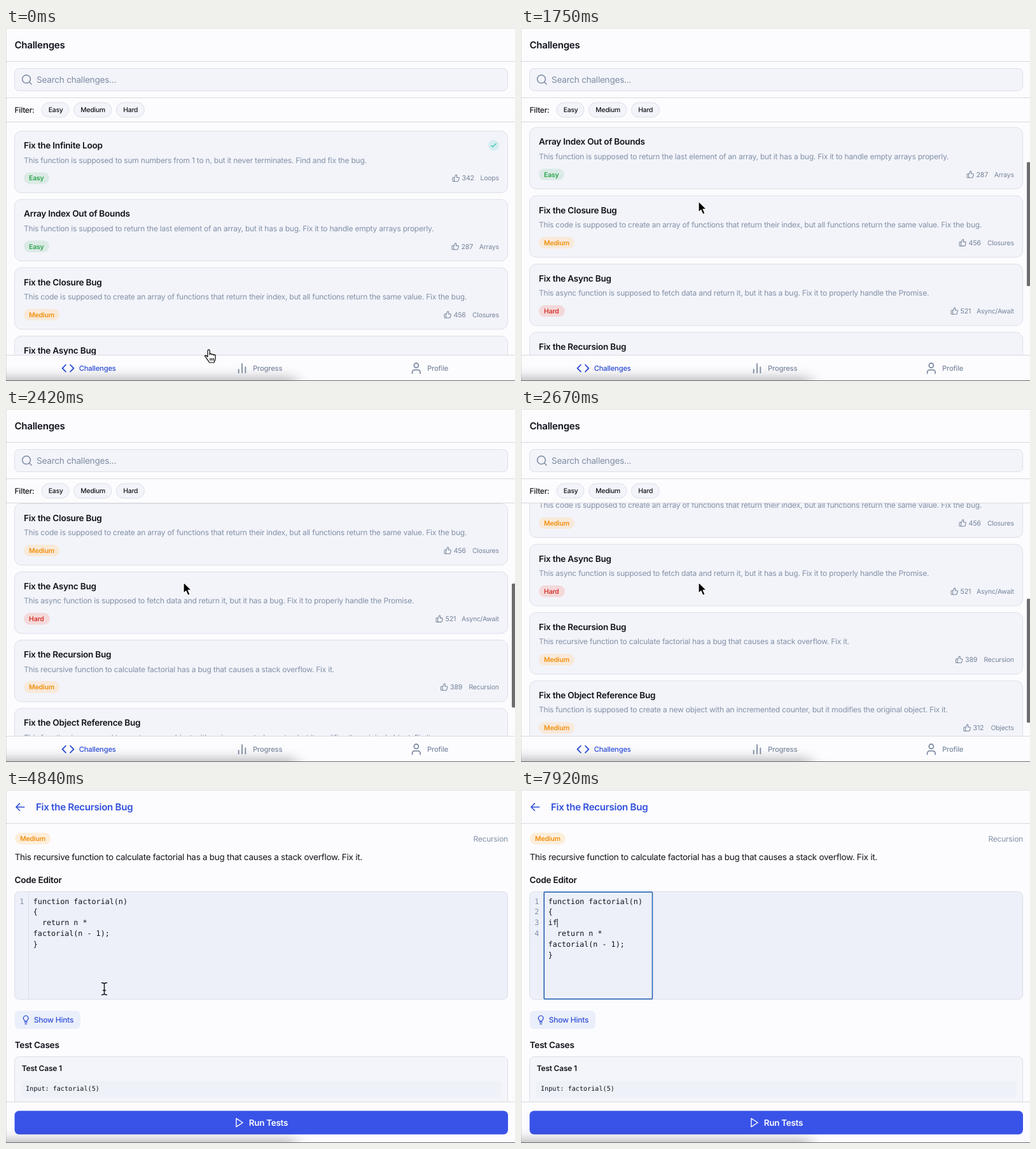
These frames come from a looping animation (800 px wide and 554 px high, 8000 ms). An HTML page:

```html
<!DOCTYPE html>
<html lang="en">
<head>
<meta charset="utf-8">
<title>Challenges</title>
<style>
html, body { margin: 0; width: 100%; height: 100%; overflow: hidden; background: #fcfcfe; }
svg { display: block; }
text {
  font-family: Inter, "Open Sans", sans-serif; letter-spacing: -.0185em;
  text-rendering: geometricPrecision; white-space: pre;
}
.mono { font-family: "DejaVu Sans Mono", monospace; letter-spacing: 0; }
.icon { fill: none; stroke-linecap: round; stroke-linejoin: round; }
</style>
</head>
<body>
<svg id="stage" width="800" height="554" viewBox="0 0 800 554"></svg>
<script>
const LOOP = 8000;
const INK = '#11131a', GREY = '#8391a7', META = '#75839a', BLUE = '#2f4fd8';
const PANEL = '#f3f4fa', EDGE = '#dcdfe8', RULE = '#d9dae0', PAGE = '#fcfcfe';

const LEVELS = {
  Easy: { width: 40, fill: '#dbeae5', ink: '#27a54b' },
  Medium: { width: 56, fill: '#f8e9d9', ink: '#f0900f' },
  Hard: { width: 41, fill: '#f4d9da', ink: '#d5382f' }
};

// title, description, level, likes, topic, x of the likes
const CARDS = [
  ['Fix the Infinite Loop', 'This function is supposed to sum numbers from 1 to n, but it never terminates. Find and fix the bug.', 'Easy', 342, 'Loops', 716.5],
  ['Array Index Out of Bounds', 'This function is supposed to return the last element of an array, but it has a bug. Fix it to handle empty arrays properly.', 'Easy', 287, 'Arrays', 715.5],
  ['Fix the Closure Bug', 'This code is supposed to create an array of functions that return their index, but all functions return the same value. Fix the bug.', 'Medium', 456, 'Closures', 703.5],
  ['Fix the Async Bug', 'This async function is supposed to fetch data and return it, but it has a bug. Fix it to properly handle the Promise.', 'Hard', 521, 'Async/Await', 690.5],
  ['Fix the Recursion Bug', 'This recursive function to calculate factorial has a bug that causes a stack overflow. Fix it.', 'Medium', 389, 'Recursion', 698],
  ['Fix the Object Reference Bug', 'This function is supposed to create a new object with an incremented counter, but it modifies the original object. Fix it.', 'Medium', 312, 'Objects', 710.5]
];

const ICONS = {
  code: 'M16 18l6-6-6-6M8 6l-6 6 6 6',
  bars: 'M18 20V10M12 20V4M6 20v-6',
  person: 'M19 21v-2a4 4 0 0 0-4-4H9a4 4 0 0 0-4 4v2M16 7a4 4 0 1 1-8 0a4 4 0 1 1 8 0',
  thumb: 'M7 10v12M15 5.9L14 10h5.8a2 2 0 0 1 2 2.6l-2.4 8a2 2 0 0 1-1.9 1.4H4a2 2 0 0 1-2-2v-8a2 2 0 0 1 2-2h2.8a2 2 0 0 0 1.8-1.1L12 2a3.1 3.1 0 0 1 3 3.9Z',
  search: 'M19 11a8 8 0 1 1-16 0a8 8 0 1 1 16 0M21 21l-4.3-4.3',
  check: 'M20 6L9 17l-5-5',
  back: 'M20 12H4M11 19l-7-7 7-7',
  play: 'M5 3l14 9-14 9z',
  bulb: 'M9 18h6M10 22h4M9 14.5c-.2-1-.7-1.7-1.4-2.5A6 6 0 1 1 16.4 12c-.7.8-1.2 1.5-1.4 2.5V15H9z'
};

const text = (x, y, str, size, fill = INK, weight = 400, extra = '') =>
  `<text x="${x}" y="${y}" font-size="${size}" fill="${fill}" font-weight="${weight}" ${extra}>${str}</text>`;
const mono = (x, y, str, size = 11.73, fill = INK) => text(x, y, str, size, fill, 400, 'class="mono"');
const right = (x, y, str, size, fill) => text(x, y, str, size, fill, 400, 'text-anchor="end"');
const box = (x, y, w, h, r, fill, stroke = 'none') =>
  `<rect x="${x}" y="${y}" width="${w}" height="${h}" rx="${r}" fill="${fill}" stroke="${stroke}"/>`;
const rule = y => `<path d="M0 ${y}H800" stroke="${RULE}"/>`;
const icon = (name, cx, cy, scale, color, width = 2) =>
  `<path class="icon" d="${ICONS[name]}" stroke="${color}" stroke-width="${width}"
    transform="translate(${cx} ${cy}) scale(${scale}) translate(-12 -12)"/>`;

function badge(level, x, y, fill) {
  const b = LEVELS[level];
  return box(x, y, b.width, 18.4, 9.2, fill || b.fill) + text(x + 8, y + 13, level, 10.5, b.ink, 600);
}

function card([title, desc, level, likes, topic, likesX], i) {
  const y = 13.9 + i * 107.15;
  return box(13.5, y, 775, 96.6, 10.5, PANEL, EDGE) +
    text(28, y + 27.3, title, 13.6, INK, 600) +
    text(28, y + 49.8, desc, 12, GREY) +
    badge(level, 28, y + 64.5) +
    icon('thumb', likesX - 9.3, y + 73.6, .52, META, 2) +
    text(likesX, y + 77.5, likes, 10.7, META) +
    right(774.7, y + 77.5, topic, 10.4, META) +
    (i ? '' : `<circle cx="766.4" cy="${y + 22.4}" r="8.4" fill="#d5edf0"/>` +
      icon('check', 766.4, y + 22.4, .48, '#20bd9d', 2.4));
}

const chip = (x, w, label) =>
  box(x, 117, w, 23, 11.5, PANEL, EDGE) + text(x + 10.7, 132.3, label, 10.4, INK, 500);

const listView = `<g id="list">
  ${text(13.5, 32.3, 'Challenges', 15.1, INK, 600)}
  ${rule(52.5)}
  ${box(13.5, 63.5, 775, 35, 7, PANEL, EDGE)}
  ${icon('search', 32.8, 81, .8, '#7f8ca2', 1.9)}
  ${text(48, 86.3, 'Search challenges...', 13.6, '#7f8ca2')}
  ${rule(109.5)}
  ${text(13.5, 133, 'Filter:', 12, INK, 500)}
  ${chip(56, 43, 'Easy')}${chip(106.5, 59.5, 'Medium')}${chip(173.5, 44, 'Hard')}
  <svg y="148" width="800" height="365" overflow="hidden"><g id="cards">${CARDS.map(card).join('')}</g></svg>
  ${rule(147.5)}
  <rect id="bar" x="795" width="6" height="194.5" rx="1.5" fill="#6d6d70"/>
  ${rule(513.5)}
  ${icon('code', 97.5, 534, .89, BLUE)}${text(114.7, 538.2, 'Challenges', 11.25, BLUE, 500)}
  ${icon('bars', 371, 534, .89, '#7f8ca3')}${text(388, 538.2, 'Progress', 11.25, '#7f8ca3', 500)}
  ${icon('person', 644.8, 534, .89, '#7f8ca3')}${text(662, 538.2, 'Profile', 11.25, '#7f8ca3', 500)}
</g>`;

const detailView = `<g id="detail">
  ${icon('back', 22.3, 26.7, .8, BLUE, 2)}
  ${text(47, 32.3, 'Fix the Recursion Bug', 15.1, '#3150dc', 600)}
  ${rule(52.5)}
  ${badge('Medium', 14, 67, '#fdeedb')}
  ${right(789, 80.7, 'Recursion', 12, GREY)}
  ${text(13.7, 110.4, CARDS[4][1], 13.45)}
  ${text(13.5, 145.8, 'Code Editor', 13.6, INK, 600)}
  ${box(13.5, 159.5, 775, 169, 7, '#edf0f9', EDGE)}
  <path d="M35.5 160V328" stroke="${EDGE}"/>
  <g id="code"></g>
  <rect id="focus" x="36.3" y="160.2" width="170.2" height="167.8" rx="1" fill="none" stroke="#1f5fb4" stroke-width="1.5"/>
  <path id="caret" stroke="${INK}"/>
  ${box(13.5, 346.5, 103.5, 28.5, 7, '#ebeffb')}
  ${icon('bulb', 31.2, 360.7, .63, BLUE, 2)}
  ${text(43.7, 365.2, 'Show Hints', 12, BLUE, 500)}
  ${text(13.7, 405, 'Test Cases', 13.6, INK, 600)}
  <svg width="800" height="489" overflow="hidden">
    ${box(13.5, 418.5, 775, 110, 7, '#f4f5fa', EDGE)}
    ${text(24.8, 440.5, 'Test Case 1', 12, INK, 600)}
    ${box(24.5, 457, 753.5, 25, 3.5, '#eef1f8')}
    ${mono(31, 472.3, 'Input: factorial(5)', 10.15)}
  </svg>
  ${rule(489.5)}
  ${box(13.5, 503.5, 775.5, 37, 7, '#3953e8')}
  ${icon('play', 367, 522, .73, '#fff', 1.9)}
  ${text(381.7, 527, 'Run Tests', 13.4, '#fff', 600)}
</g>`;

const overlay = `
  <defs>
    <filter id="blur" x="-30%" y="-100%" width="160%" height="300%"><feGaussianBlur stdDeviation="11"/></filter>
  </defs>
  <rect x="-60" y="553" width="518" height="40" rx="12" fill="#000" opacity=".4" filter="url(#blur)"/>
  <path d="M0 553.5H800" stroke="#6c6c70"/>
  <path d="M0 .5H800M.5 0V554" stroke="#000" opacity=".1"/>
  <g id="pointer">
    <path id="arrow" d="M0 0V17.2L3.9 13.6L6.9 20.4L10.2 19L7.2 12.4H12.4Z" fill="#000" stroke="#fff" stroke-width="1.2" stroke-linejoin="round"/>
    <path id="hand" d="M-1.5 1.5a1.6 1.6 0 0 1 3.2 0V8l.2-1a1.5 1.5 0 0 1 2.9.5l.2.3a1.5 1.5 0 0 1 2.8.5l.3.3a1.3 1.3 0 0 1 2.5.7v4.5c0 3-2 4-2 6.2H1C.6 18-2 15.5-3.8 12.8-5 11-6.5 10.5-6 9.5c.8-1.2 2.6-.5 4.5 1.6ZM2.4 13v4M5 13v4M7.6 13v4" fill="#fff" stroke="#000" stroke-width="1.2" stroke-linejoin="round"/>
    <path id="beam" class="icon" d="M-4 -9.5Q0 -9.5 0 -7Q0 -9.5 4 -9.5M0 -7V7M-4 9.5Q0 9.5 0 7Q0 9.5 4 9.5M-2 2.5H2" stroke="#111" stroke-width="1.4"/>
  </g>`;

const stage = document.getElementById('stage');
stage.innerHTML = box(0, 0, 800, 554, 0, PAGE) + listView + detailView + overlay;
const el = id => document.getElementById(id);
const show = (id, on) => el(id).setAttribute('visibility', on ? 'visible' : 'hidden');

// Each step: time, then values reached at that time.
const SCROLL = [[0, 0], [950, 0], [1150, 18], [1450, 70], [1750, 112.7], [2080, 176], [2420, 227.6], [2700, 276], [2900, 299], [3050, 305.7]];
const BAR = [[950, 0], [1050, 1], [3250, 1], [3500, 0]];
const POINTER = [[0, 318.5, 505], [120, 318, 505], [480, 296, 370], [760, 279, 272], [3150, 279, 272], [3400, 222, 297],
  [3670, 168, 312], [3850, 154.5, 312], [5300, 154.5, 312], [5850, 146, 240], [6250, 122, 193], [6650, 62, 193], [6800, 54, 192]];
const SHAPES = [[0, 'hand'], [1000, 'arrow'], [3750, 'hand'], [4080, 'beam'], [5900, 'arrow'], [6450, 'beam'], [7250, 'none']];
const OPEN = 4000, FOCUS = 6920, ENTER = 7300, TYPING = [7600, 7760];

const last = (steps, t) => steps.filter(s => s[0] <= t).pop();

function at(steps, t, k = 1) {
  const i = steps.findIndex(s => s[0] > t);
  if (i < 0) return steps[steps.length - 1][k];
  if (i === 0) return steps[0][k];
  const a = steps[i - 1], b = steps[i];
  return a[k] + (b[k] - a[k]) * (t - a[0]) / (b[0] - a[0]);
}

let shownCode;
function drawCode(t) {
  const typed = 'if'.slice(0, TYPING.filter(k => k <= t).length);
  const lines = ['function factorial(n)', '{', '  return n *', 'factorial(n - 1);', '}'];
  const edited = t >= ENTER;
  if (edited) lines.splice(2, 0, typed);
  const key = lines.join('\n');
  if (key !== shownCode) {
    shownCode = key;
    const row = i => 178.6 + 16.85 * i;
    const numbers = edited ? [1, 2, 3, 4] : [1];
    el('code').innerHTML = numbers.map((n, i) => mono(21.3, row(i), n, 11.73, GREY)).join('') +
      lines.map((line, i) => mono(42.8, row(i), line)).join('');
  }
  const x = 43 + 7.06 * (edited ? typed.length : 1);
  const y = edited ? 202 : 185;
  el('caret').setAttribute('d', `M${x} ${y}v13.5`);
}

function draw(t) {
  const detail = t >= OPEN, focused = t >= FOCUS;
  show('list', !detail);
  show('detail', detail);
  show('focus', focused);
  show('caret', focused);
  const scroll = at(SCROLL, t);
  el('cards').setAttribute('transform', `translate(0 ${-scroll})`);
  el('bar').setAttribute('y', 148 + scroll * .553);
  el('bar').setAttribute('opacity', at(BAR, t));
  drawCode(t);
  const shape = last(SHAPES, t)[1];
  for (const id of ['arrow', 'hand', 'beam']) show(id, id === shape);
  el('pointer').setAttribute('transform', `translate(${at(POINTER, t)} ${at(POINTER, t, 2)})`);
}

const start = performance.now();
function tick() {
  draw((performance.now() - start) % LOOP);
  requestAnimationFrame(tick);
}
tick();
</script>
</body>
</html>
```
